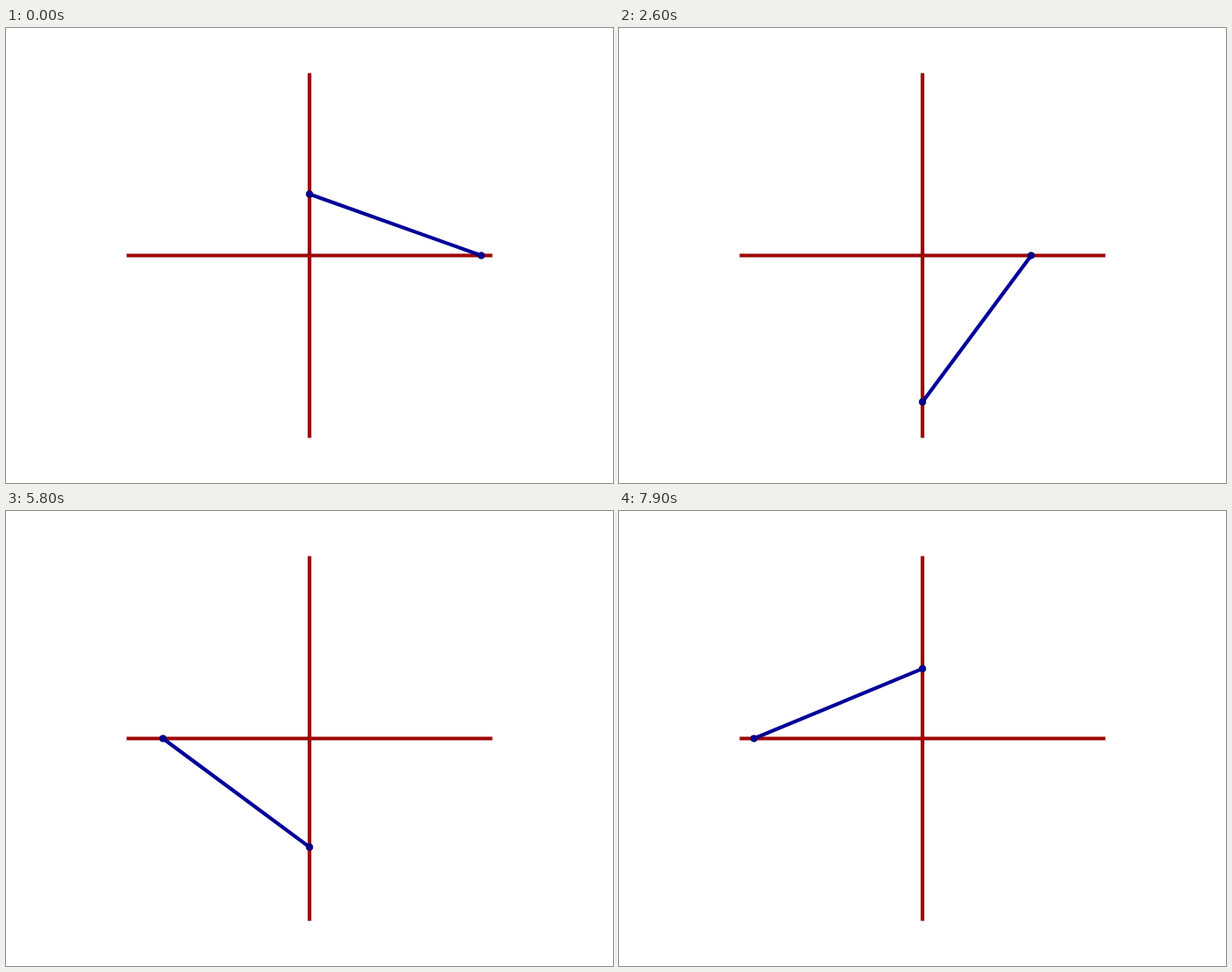
Recreate the animation shown at these times as an HTML page. Size 692 by 519 pixels, loop 8 s.

```html
<!DOCTYPE html>
<html>
<head>
<meta charset="utf-8">
<title>Sliding ladder</title>
<style>
  html, body { margin: 0; width: 100%; height: 100%; overflow: hidden; background: #fff; }
  svg { display: block; }
</style>
</head>
<body>
<svg width="692" height="519" viewBox="-346 -259.5 692 519">
  <g stroke="#900000" stroke-width="4.2">
    <path d="M-208.5 0H208.5M0-208V208"/>
    <path d="M-208 0H208M0-207.5V207.5" stroke="#a80000" stroke-width="2.2"/>
  </g>
  <line id="rod" stroke="#000098" stroke-width="4.2"/>
  <g fill="#000098" stroke="#000050" stroke-width=".8">
    <circle id="slideX" r="3.8"/>
    <circle id="slideY" r="3.8"/>
  </g>
</svg>
<script>
const LENGTH = 208, STEP = 100, LOOP = 8000, TURN_STEPS = 128, START = 7;
const [rod, slideX, slideY] = ['rod', 'slideX', 'slideY'].map(id => document.getElementById(id));

function draw(now) {
  const step = Math.floor(now % LOOP / STEP);
  const angle = (START - step) * 2 * Math.PI / TURN_STEPS;
  const x = LENGTH * Math.cos(angle), y = -LENGTH * Math.sin(angle);
  rod.setAttribute('x1', x);
  rod.setAttribute('y2', y);
  slideX.setAttribute('cx', x);
  slideY.setAttribute('cy', y);
}

const start = performance.now();
function tick() {
  draw(performance.now() - start);
  requestAnimationFrame(tick);
}
tick();
</script>
</body>
</html>
```
